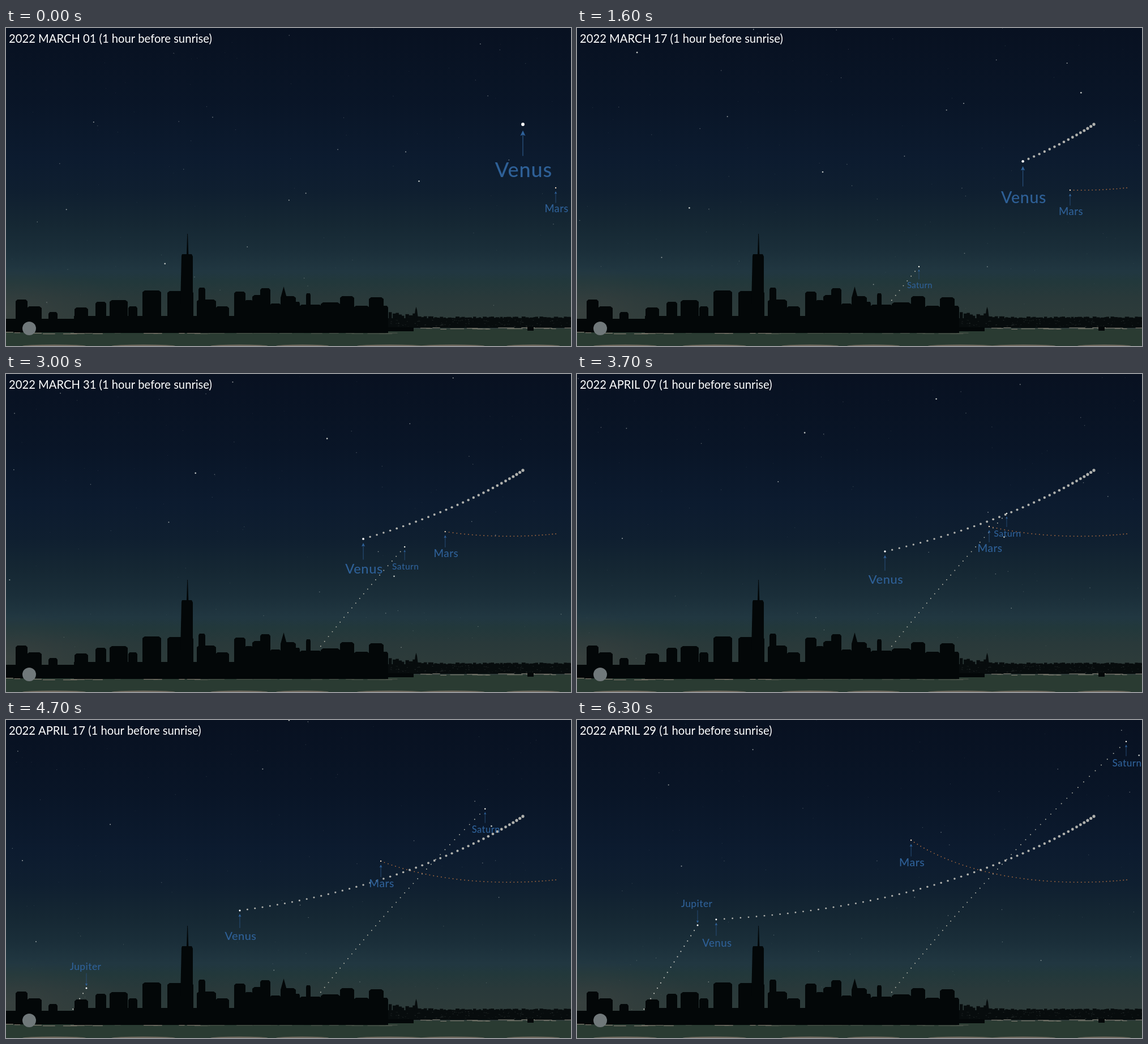
An HTML page with a canvas that plays this animation: 998 px wide and 561 px high, repeating every 6400 ms.

```html
<!DOCTYPE html>
<html lang="en">
<head>
<meta charset="utf-8">
<title>Morning planets</title>
<style>
  html, body { margin: 0; width: 100%; height: 100%; overflow: hidden; background: #081121; }
  canvas { display: block; }
</style>
</head>
<body>
<canvas id="stage" width="998" height="561"></canvas>
<script>
const W = 998, H = 561, LOOP = 6400;
const ctx = document.getElementById('stage').getContext('2d');

// x, y and label size are polynomials of the day; label offsets are in ems
const planets = [
  { name: 'Saturn', rise: 7, color: '#f4f4ec', trail: '#b4b5a9', dot: 1.25, bead: 0.95,
    tip: 0.33, tail: 1.5, base: 2.55,
    x: [493, 7.14, -0.0234, 0.000668], y: [560.7, -9.28, 0.0441, -0.000627], size: [14, 0.055] },
  { name: 'Mars', rise: 0, color: '#f0d8bc', trail: '#a3673f', dot: 1.2, bead: 0.95,
    tip: 0.33, tail: 1.47, base: 2.38,
    x: [971, -5.731, -0.0399, 0.000468], y: [282, 0.579, -0.0171, -0.000217], size: [18.2, 0.022] },
  { name: 'Venus', rise: 0, color: '#ffffff', trail: '#b0b1ad', dot: 0.08, bead: 0.073, scaled: true,
    tip: 0.3, tail: 1.55, base: 2.59,
    x: [913, -5.121, -0.2081, 0.002635, -0.000015], y: [170, 3.455, 0.0676, -0.00199, 0.0000125],
    size: [36, -0.53, 0.004] },
  { name: 'Jupiter', rise: 43, color: '#ffffff', trail: '#c2c4be', dot: 1.5, bead: 1.1,
    tip: -0.22, tail: -1.52, base: -1.86,
    x: [-136.1, 5.917], y: [907.8, -9.25], size: [17.4] }
];

// Brightest stars: day, x, y
const bright = [
  [8, 809, 192], [16, 434, 254], [23, 267, 246], [8, 23, 126], [23, 618, 426],
  [8, 606, 212], [8, 234, 84], [8, 576, 224], [8, 187, 238], [8, 785, 140],
  [23, 219, 333], [37, 80, 290], [47, 53, 391], [47, 29, 248]
];

function seeded(s) {
  return () => (s = (s * 16807) % 2147483647) / 2147483647;
}

function poly(c, d) {
  return c.reduceRight((sum, k) => sum * d + k, 0);
}

function place(p, day) {
  return [p.x, p.y, p.size].map(c => poly(c, day));
}

const rnd = seeded(4127);
const stars = bright.map((at, i) => ({ at, r: i < 5 ? 1.35 : 1, a: i < 5 ? 0.85 : 0.65 }));
for (let i = 0; i < 400; i++) {
  const glow = rnd() ** 4;
  stars.push({ at: [0, -700 + 1700 * rnd(), 1150 * rnd()], r: 0.5 + 0.4 * glow, a: 0.12 + 0.45 * glow });
}

// Carry a star across the sky one day at a time
function drift([from, x, y], day) {
  const dir = Math.sign(day - from);
  for (let d = from; d !== day; d += dir) {
    const k = dir * (1 + 0.0001 * Math.max(0, d - 25) ** 2);
    const dx = 9.5 + 5e-6 * (x - 480) ** 2;
    const dy = -10 + 0.0008 * (x - 500);
    x += k * dx;
    y += k * dy;
  }
  return [x, y];
}

function dot(x, y, r, color) {
  ctx.fillStyle = color;
  ctx.beginPath();
  ctx.arc(x, y, r, 0, 7);
  ctx.fill();
}

function box(x, y, w, h, color) {
  ctx.fillStyle = color;
  ctx.fillRect(x, y, w, h);
}

function fill(points, color) {
  ctx.fillStyle = color;
  ctx.beginPath();
  points.forEach(([x, y]) => ctx.lineTo(x, y));
  ctx.fill();
}

function drawSky() {
  const g = ctx.createLinearGradient(0, 0, 0, 535);
  [[0, '#081121'], [130, '#091527'], [230, '#0c1b2f'], [290, '#0f1f30'], [345, '#152733'],
   [390, '#1a2e39'], [430, '#213741'], [447, '#22383b'], [475, '#29393a'], [535, '#303d3a']]
    .forEach(([y, c]) => g.addColorStop(y / 535, c));
  box(0, 0, W, H, g);
  ctx.save();
  ctx.translate(0, 500);
  ctx.scale(1, 0.36);
  const glow = ctx.createRadialGradient(0, 0, 0, 0, 0, 220);
  glow.addColorStop(0, 'rgba(74,74,70,.4)');
  glow.addColorStop(1, 'rgba(64,68,66,0)');
  box(0, -240, 240, 340, glow);
  ctx.restore();
}

const block = '#030708', far = '#070c0d';

// Main buildings: left, width, top
const buildings = [
  [17, 21, 479], [37, 26, 491], [75, 16, 501], [121, 24, 493], [158, 19, 483], [183, 32, 480],
  [216, 16, 491], [241, 33, 463], [285, 46, 464], [340, 12, 458], [337, 34, 479], [370, 24, 491],
  [403, 20, 465], [422, 14, 480], [435, 32, 471], [449, 18, 459], [466, 20, 486], [485, 27, 473],
  [511, 8, 483], [518, 40, 488], [530, 8, 468], [556, 34, 484], [590, 25, 473], [614, 28, 490],
  [641, 26, 475], [660, 15, 490]
];

function drawFarShore() {
  const r = seeded(911);
  box(667, 512, W - 667, 17, far);
  for (let x = 676; x < W; x += 3 + 5 * r()) {
    const near = Math.max(0, 1 - (x - 676) / 90);
    const h = 3 * r() + (4 + 8 * r()) * near;
    box(x, 512 - h, 4 + 4 * r(), h + 1, far);
  }
  fill([[721, 513], [723, 497], [724.5, 492], [726, 497], [728, 513]], far);
  for (let i = 0; i < 110; i++) {
    box(676 + 322 * r(), 514 + 12 * r(), 1 + 2 * r(), 0.8, `rgba(95,105,102,${0.1 + 0.3 * r()})`);
  }
  for (let x = 678; x < W; x += 8 + 24 * r()) {
    box(x, 528 + 3 * r(), 8 + 22 * r(), 1.2, '#77766c');
  }
  box(667, 528, 53, 7, block);
  box(921, 527, 11, 7, block);
}

function drawCity() {
  box(0, 513, 121, 23, block);
  box(120, 508, 555, 30, block);
  for (const [x, w, top] of buildings) {
    const cut = Math.min(4, w * 0.15);
    fill([[x, 537], [x, top + 3], [x + cut, top], [x + w - cut, top], [x + w, top + 3], [x + w, 537]], block);
  }
  fill([[307, 530], [310, 402], [311, 399], [328, 399], [330, 403], [330, 530]], block);
  fill([[319, 400], [320.2, 363], [321, 363], [322.4, 400]], block);
  fill([[485, 476], [490.5, 456], [496, 476]], block);
}

function drawWater() {
  const r = seeded(77);
  box(0, 531, W, H - 531, '#2a3b32');
  box(0, 531, 675, 6, block);
  drawFarShore();
  for (let x = 0; x < 680; x += 10 + 26 * r()) {
    box(x, 536 + 3 * r(), 10 + 22 * r(), 1.2, x < 330 ? '#817a6f' : '#4a5349');
  }
  for (let x = 40; x < W; x += 110 + 60 * r()) {
    ctx.fillStyle = '#716b60';
    ctx.beginPath();
    ctx.ellipse(x + 45, 561, 45 + 15 * r(), 2.5, 0, 0, 7);
    ctx.fill();
  }
}

function drawLabel(p, x, y, size) {
  const tip = y + p.tip * size, tail = y + p.tail * size;
  const head = Math.sign(p.tail) * 0.26 * size, wing = 0.125 * size;
  ctx.strokeStyle = '#284f7a';
  ctx.lineWidth = 0.5 + 0.025 * size;
  ctx.beginPath();
  ctx.moveTo(x, tip + head / 2);
  ctx.lineTo(x, tail);
  ctx.stroke();
  fill([[x, tip], [x + wing, tip + head], [x, tip + head * 0.8], [x - wing, tip + head]], '#2f629b');
  ctx.font = `500 ${size}px Lato, sans-serif`;
  ctx.letterSpacing = `${0.025 * size}px`;
  ctx.textAlign = 'center';
  ctx.fillStyle = '#2e6097';
  ctx.fillText(p.name, x + Math.sign(p.tail) * 1.5, y + p.base * size);
}

function drawPlanets(day) {
  const up = planets.filter(p => day >= p.rise);
  for (const p of up) {
    for (let d = p.rise; d < day; d++) {
      const [x, y, size] = place(p, d);
      dot(x, y, p.bead * (p.scaled ? size : 1), p.trail);
    }
  }
  for (const p of up) {
    const [x, y, size] = place(p, day);
    drawLabel(p, x, y, size);
    dot(x, y, p.dot * (p.scaled ? size : 1), p.color);
  }
}

function drawTitle(day) {
  const month = day < 31 ? 'MARCH' : 'APRIL';
  const date = String(day % 31 + 1).padStart(2, '0');
  ctx.font = '20.2px Lato, sans-serif';
  ctx.letterSpacing = '0px';
  ctx.textAlign = 'left';
  ctx.fillStyle = '#ffffff';
  ctx.fillText(`2022 ${month} ${date} (1 hour before sunrise)`, 5, 26);
}

function draw(day) {
  drawSky();
  for (const s of stars) {
    const [x, y] = drift(s.at, day);
    if (y < 512) dot(x, y, s.r, `rgba(222,226,220,${s.a})`);
  }
  drawPlanets(day);
  drawWater();
  drawCity();
  dot(41, 530, 12, '#70787a');
  drawTitle(day);
}

// One day per step, with a pause on April 24
function dayAt(ms) {
  const step = Math.floor(ms / 100);
  return step < 59 ? Math.min(step, 54) : step - 4;
}

const start = performance.now();
let shown = -1;
function tick() {
  const day = dayAt((performance.now() - start) % LOOP);
  if (day !== shown) draw(shown = day);
  requestAnimationFrame(tick);
}
tick();
</script>
</body>
</html>
```
